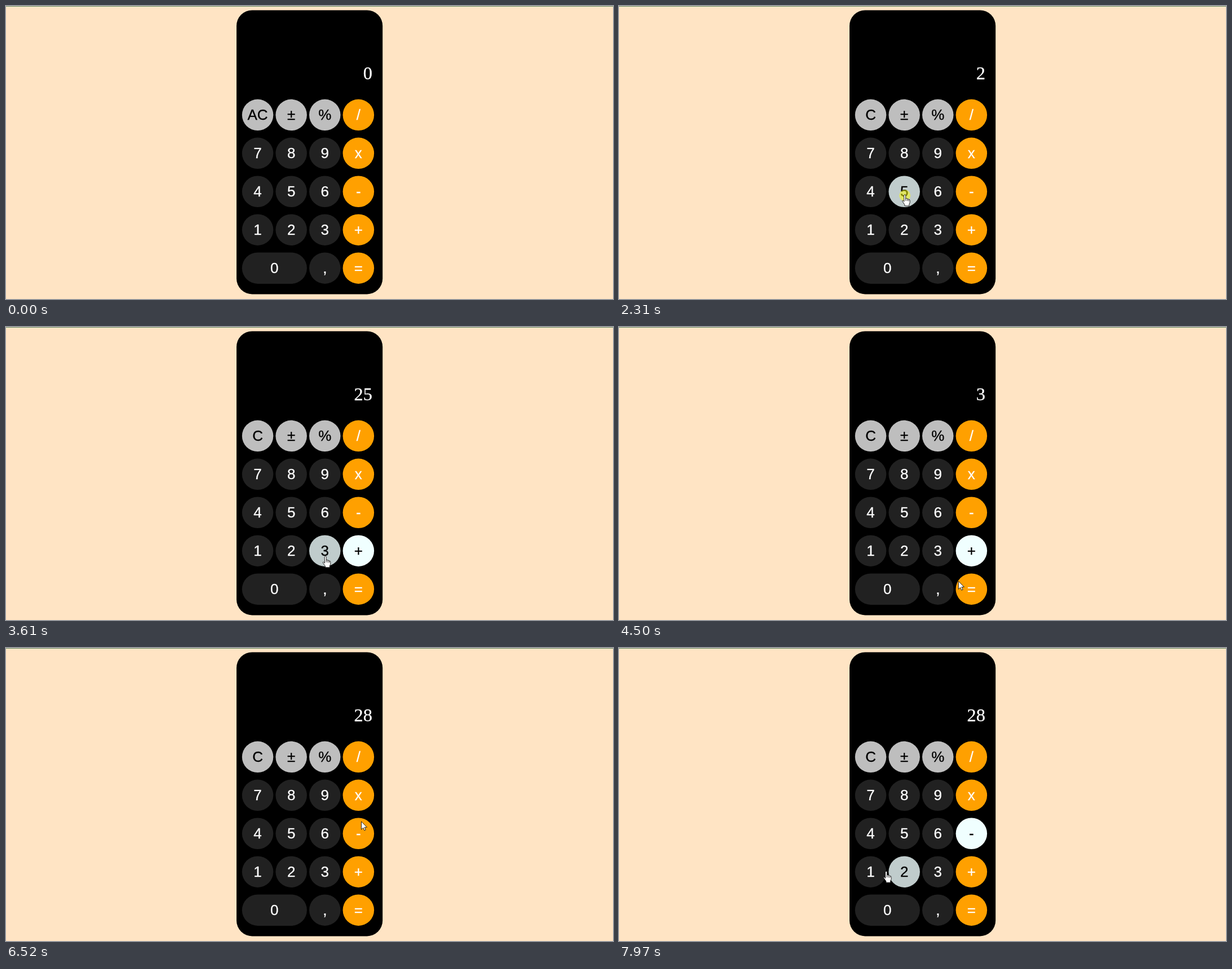
An HTML page for the animation above (8 s loop, 1077 by 520 pixels).

```html
<!DOCTYPE html>
<html lang="en">
<head>
<meta charset="utf-8">
<title>Calculator</title>
<style>
  html, body { margin: 0; width: 100%; height: 100%; overflow: hidden; background: #ffe4c4; }
  svg { display: block; width: 100%; height: 100%; }
  .key { font: 26px Arial, "Liberation Sans", sans-serif; text-anchor: middle; stroke-width: .3; }
  #display { font: 32.4px "Times New Roman", "Liberation Serif", serif; text-anchor: end; fill: #fff; stroke: #fff; stroke-width: .3; }
</style>
</head>
<body>
<svg viewBox="0 0 1077 520">
  <rect width="1077" height="1" fill="#5b8560"/>
  <rect x="409" y="7.4" width="259.2" height="504" rx="27.75"/>
  <text id="display" x="650" y="130"></text>
  <g id="keys"></g>
  <g id="pointer">
    <circle id="press" r="10" fill="#ff0" fill-opacity=".5"/>
    <path id="arrow" d="M0 0V14.2L3.3 11.1 5.4 16 7.7 15 5.6 10.3H10Z" fill="#fff" stroke="#111" stroke-width=".9"/>
    <g id="hand" stroke="#111" stroke-width=".9" stroke-linejoin="round" stroke-linecap="round">
      <path d="M-1.5 0Q-1.3-1.5 0-1.5T1.5 0V5.2Q3.9 4.6 4.2 6Q6.2 5.4 6.7 7Q9 6.6 9 9V12.5L7.6 16V18.6H-.2V16.4L-4.3 10.5Q-4.9 8.8-3.4 8.8L-1.5 10.6Z" fill="#fff"/>
      <path d="M1.5 5.2V9M4.2 6.2V9.4M6.7 7.2V9.8" fill="none"/>
    </g>
  </g>
</svg>
<script>
const LOOP = 8000, STEP = 68;
const SIZE = 55.5, RADIUS = SIZE / 2, PITCH_X = 59.6, PITCH_Y = 67.95;
const $ = id => document.getElementById(id);

function svg(tag, attrs, parent) {
  const el = document.createElementNS("http://www.w3.org/2000/svg", tag);
  for (const name in attrs) el.setAttribute(name, attrs[name]);
  return parent.appendChild(el);
}

// Keypad, one character per key; a space is covered by the wide "0".
const keys = {};
["A±%/", "789x", "456-", "123+", "0 ,="].forEach((labels, row) => [...labels].forEach((label, col) => {
  if (label === " ") return;
  const x = 418.8 + col * PITCH_X, y = 165.6 + row * PITCH_Y;
  const width = label === "0" ? SIZE + PITCH_X : SIZE;
  const [fill, ink] = col === 3 ? ["#ffa000", "#fff"] : row === 0 ? ["#bebebe", "#000"] : ["#212121", "#fff"];
  const face = svg("rect", { x, y, width, height: SIZE, rx: RADIUS }, $("keys"));
  const text = svg("text", { class: "key", x: x + width / 2, y: y + RADIUS + 8.8 }, $("keys"));
  text.textContent = label;
  keys[label] = { label, cx: x + width / 2, cy: y + RADIUS, reach: (width - SIZE) / 2, fill, ink, face, text };
}));

// Pointer moves, each ending at an offset from a key's centre; bow bends the way there.
const ENTRY = [1031, 505];
const moves = [
  { start: 240, end: 500, key: "+", dx: 92, dy: 12 },
  { start: 632, end: 1250, key: "2", dx: -1, dy: 7 },
  { start: 1970, end: 2240, key: "5", dx: 1, dy: 7 },
  { start: 2440, end: 2920, key: "+", dx: 5, dy: 0, bow: 22 },
  { start: 3200, end: 3610, key: "3", dx: 1, dy: 11 },
  { start: 4024, end: 4500, key: "=", dx: -23, dy: -14, bow: 8 },
  { start: 4500, end: 4640, key: "=", dx: 8, dy: -14 },
  { start: 5570, end: 5990, key: "/", dx: 7, dy: -86, bow: -45 },
  { start: 6112, end: 6660, key: "-", dx: 5, dy: -8 },
  { start: 7270, end: 8320, key: "1", dx: 8, dy: 10 }
];
const clicks = [
  { down: 1840, up: 1970, key: "2" },
  { down: 2310, up: 2440, key: "5" },
  { down: 2990, up: 3120, key: "+" },
  { down: 3940, up: 4010, key: "3" },
  { down: 5100, up: 5240, key: "=" },
  { down: 7070, up: 7140, key: "-" }
];

const easeOut = f => 1 - (1 - f) ** 2;

function pointerAt(t) {
  if (t < moves[0].start) return null;
  let [x, y] = ENTRY;
  for (const { start, end, key, dx, dy, bow = 0 } of moves) {
    if (t < start) break;
    const duration = end - start, steps = Math.round(duration / STEP);
    // The pointer is sampled in steps rather than gliding.
    const f = Math.min(1, Math.floor((t - start) / duration * steps + .06) / steps);
    const e = easeOut(f), bend = bow * Math.sin(Math.PI * e);
    const vx = keys[key].cx + dx - x, vy = keys[key].cy + dy - y, length = Math.hypot(vx, vy);
    x += vx * e - vy / length * bend;
    y += vy * e + vx / length * bend;
  }
  return [x, y];
}

function contains({ cx, cy, reach }, [x, y]) {
  return Math.hypot(Math.max(0, Math.abs(x - cx) - reach), y - cy) <= RADIUS;
}

// Replays the clicks released so far.
function calculate(t) {
  let entry = "0", stored = 0, operator = "", fresh = true;
  for (const { key } of clicks.filter(click => click.up <= t)) {
    if (key === "=") {
      entry = String(operator === "+" ? stored + +entry : stored - entry);
      operator = "";
      fresh = true;
    } else if (key === "+" || key === "-") {
      stored = +entry;
      operator = key;
      fresh = true;
    } else {
      entry = fresh ? key : entry + key;
      fresh = false;
    }
  }
  return { entry, operator };
}

const show = (id, on) => $(id).setAttribute("visibility", on ? "visible" : "hidden");

function draw(t) {
  const pointer = pointerAt(t), past = pointerAt(t - STEP);   // hover trails by one step
  const hovered = past && Object.values(keys).find(key => contains(key, past));
  const { entry, operator } = calculate(t);

  for (const key of Object.values(keys)) {
    const hover = key === hovered, active = key.label === operator;
    const ink = hover || active ? "#000" : key.ink;
    key.face.setAttribute("fill", hover ? "#c0cccc" : active ? "#f0ffff" : key.fill);
    key.text.setAttribute("fill", ink);
    key.text.setAttribute("stroke", ink);
  }
  keys.A.text.textContent = entry === "0" ? "AC" : "C";
  $("display").textContent = entry;

  if (pointer) $("pointer").setAttribute("transform", `translate(${pointer})`);
  show("arrow", pointer && !hovered);
  show("hand", pointer && hovered);
  show("press", clicks.some(({ down, up }) => t >= down && t < up));
}

function frame() {
  draw(performance.now() % LOOP);
  requestAnimationFrame(frame);
}
frame();
</script>
</body>
</html>
```
